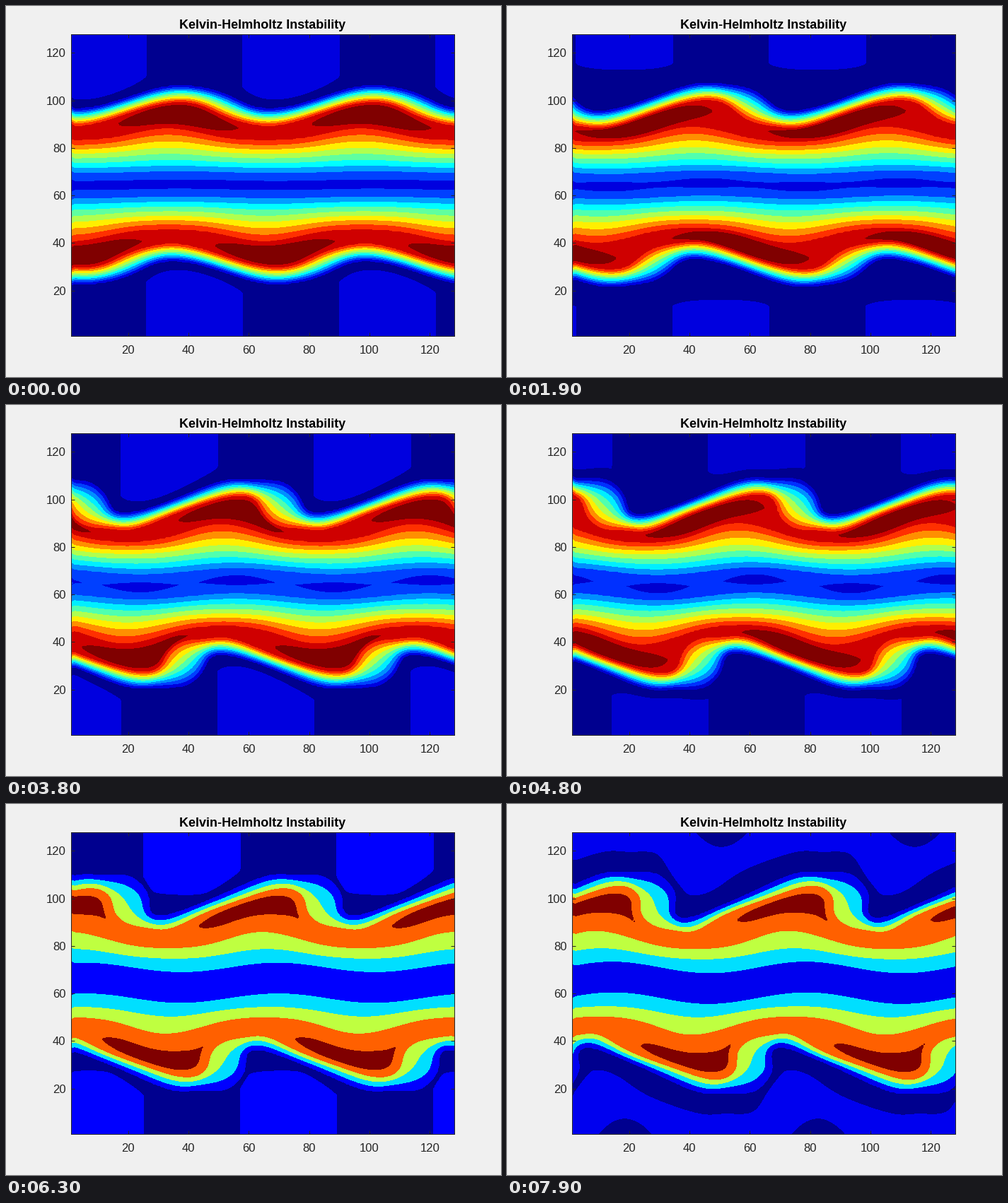
Animation of 700 by 525 pixels, one loop 8 s. Source, as a matplotlib script:

```python
import numpy as np
import matplotlib.pyplot as plt
from matplotlib.animation import FuncAnimation

plt.rcParams["font.family"] = "Liberation Sans"

W, H, DPI = 700, 525, 100
INK = "#262626"
FRAMES, HOLD = 80, 4          # the first state is held for a while
WAVE = 64                     # wavelength in grid units
COARSE_FROM = 51              # state at which the level step grows

X, Y = np.meshgrid(np.linspace(1, 128, 190), np.linspace(1, 128, 190))


def angle(x):
    return 2 * np.pi * x / WAVE


def wave(x):
    return np.cos(angle(x))


def smooth_max(a, b):
    return .5 * (a + b + np.sqrt((a - b) ** 2 + 2))


def pulse(k):
    """Slowing oscillation between 0 and 1."""
    return .5 - .5 * np.cos(np.radians(12 * k - .02 * k * k))


def core_line(xi, k):
    return 64.5 + (.3 + .04 * k) * wave(xi)


def inner_edge(u, s, k):
    """Height of level u on the flat side of the layer."""
    t = (u - 3) / 7
    swing = (3 + .04 * k) * t ** 1.3
    sway = (.3 + .03 * k) * max(0, 1 - 1.75 * t)
    lagged = s + 3.5 + .02 * k
    crest = .87 * wave(lagged) + .13 * wave(2 * lagged)
    return 70 + 15.4 * t + swing * crest + sway * wave(s)


def outer_edge(u, s, k):
    """Height of level u on the steep side; bands fan out behind the crest."""
    lean = .1 + .0037 * k

    def phase(x):
        return angle(x) + lean * (1 - wave(x))

    fan = 1.9 * (6 - u) * min(1, .2 + .02 * k)
    s = s - fan * np.maximum(0, np.sin(phase(s))) ** 2
    return 94.3 + 7 * (10 - u) / 9 + (4.9 + .064 * k) * np.cos(phase(s))


def upper_half(xi, y, k):
    """Field above the core line, built from stacked level heights."""
    beat = pulse(k)
    late = np.clip((k - 59) / 16, 0, 1)
    z = (y - 97) / 6
    s = xi - (.8 + .03 * k) * z * np.exp(-z * z / 2)

    core = 1.4 + .008 * k - .01 * k * wave(2 * xi)
    stack = [(core_line(xi, k), core)]
    stack += [(inner_edge(u, s, k), u) for u in range(3, 11)]
    rim = [(outer_edge(u, s, k), u) for u in (10, 8, 6, 4, 2, 1)]

    # The strongest fluid lies along a ridge inside the layer.
    ridge = .38 * stack[-1][0] + .62 * rim[0][0]
    swell = wave(s + 20 * beat) - wave(20 - .08 * k + 4 * beat)
    stack.append((ridge, np.maximum(11 + 1.8 * swell, 10.3)))
    stack += rim

    # Quiet fluid outside the layer, with slow patches above it.
    dip = rim[-1][0] + 1.8
    top = smooth_max(dip + .5 + 6 * late, 95.5 + 16 * beat ** 1.5)
    patch = 1 + .5 * wave(xi - 37 - 2.3 * max(0, k - 32))
    stack += [(dip, .7), (top, .7),
              (top + 4, patch + .8 * late), (top + 40, patch - .2 * late)]

    field = stack[0][1] + 0 * y
    for (h0, u0), (h1, u1) in zip(stack, stack[1:]):
        part = np.clip((y - h0) / np.maximum(h1 - h0, .05), 0, 1)
        field = field + (u1 - u0) * part
    return field


def field_at(k):
    xi = X - 37 - .56 * k
    # contours flare slightly at the left wall
    flare = .9 * np.clip((2.3 - X) / 1.3, 0, 1)
    y = Y - flare * np.sign(Y - 64.5)
    up = upper_half(xi, y, k)
    down = upper_half(xi - WAVE / 2, 129 - y, k)
    return np.where(y >= core_line(xi, k), up, down)


def jet(i):
    v = (i + 1) / 16
    rgb = (min(v - 1.5, 4.5 - v), min(v - .5, 3.5 - v), min(v + .5, 2.5 - v))
    return tuple(np.clip(rgb, 0, 1))


def band_colors(n, floor):
    pos = np.append(0, floor + np.arange(n)) / (floor + n - 1)
    return [jet(min(int(q * 64), 63)) for q in pos]


fig = plt.figure(figsize=(W / DPI, H / DPI), dpi=DPI, facecolor="#f0f0f0")
ax = fig.add_axes([91.5 / W, (H - 466.5) / H, 542 / W, 427 / H])
ax.set(xlim=(1, 128), ylim=(1, 128))
ticks = range(20, 121, 20)
ax.set_xticks(ticks)
ax.set_yticks(ticks)
ax.set_axisbelow(False)
ax.tick_params(direction="in", top=True, right=True, length=3.8, width=.72,
               color=INK, labelcolor=INK, labelsize=12)
ax.tick_params(axis="x", pad=10)
ax.tick_params(axis="y", pad=5)
for spine in ax.spines.values():
    spine.set(color=INK, linewidth=.72)
fig.text(362.5 / W, (H - 32) / H, "Kelvin-Helmholtz Instability",
         ha="center", va="baseline", size=13, weight="bold", color="black")

shown = []


def clear():
    while shown:
        shown.pop().remove()
    return []


def draw(frame):
    clear()
    k = max(0, frame - HOLD)
    coarse = k >= COARSE_FROM
    levels = np.linspace(1, 11, 5 if coarse else 11)
    floor = (1.02 - .0043 * k) * (.68 if coarse else 1)
    bands = np.concatenate([[-50], levels, [50]])
    shown.append(ax.contourf(X, Y, field_at(k), levels=bands, zorder=1,
                             colors=band_colors(len(levels), floor)))
    return shown


anim = FuncAnimation(fig, draw, frames=FRAMES, init_func=clear,
                     interval=100, repeat=True, repeat_delay=0, blit=False)
plt.show()
```
